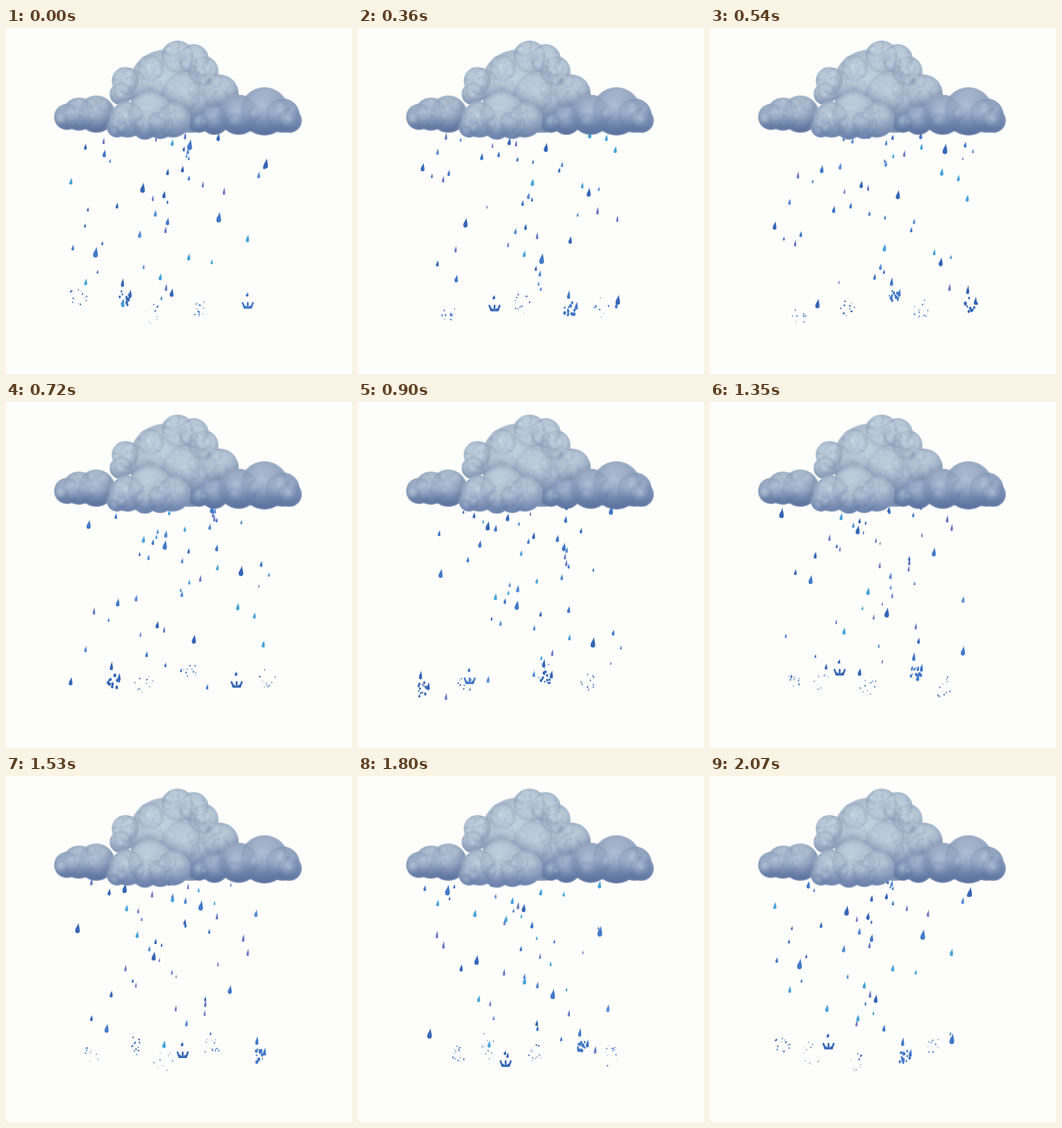
Write an HTML page with a canvas that moves like this. It is 498 px wide and 498 px high and loops after 2.16 s.

```html
<!DOCTYPE html>
<html lang="en">
<head>
<meta charset="utf-8">
<title>Rain cloud</title>
<style>
  html, body { margin: 0; width: 100%; height: 100%; overflow: hidden; background: #fdfefc; }
  canvas { display: block; width: 498px; height: 498px; }
</style>
</head>
<body>
<canvas id="stage" width="498" height="498"></canvas>
<script>
const SIZE = 498, STEPS = 24, STEP_MS = 90, TAU = Math.PI * 2;
const ctx = document.getElementById('stage').getContext('2d');

function seeded(seed) {
  return () => {
    seed = (seed + 0x6D2B79F5) | 0;
    let t = Math.imul(seed ^ (seed >>> 15), 1 | seed);
    t = (t + Math.imul(t ^ (t >>> 7), 61 | t)) ^ t;
    return ((t ^ (t >>> 14)) >>> 0) / 4294967296;
  };
}
const wrap = n => ((n % STEPS) + STEPS) % STEPS;

// ---- Cloud: groups of round puffs [x, y, radius], back to front ----
const GROUPS = [
  { tones: ['#bccbd8', '#b4c4d4', '#8a9dbc'], tufts: 60,
    puffs: [[265, 105, 46], [230, 85, 54], [308, 94, 27], [284, 62, 22], [270, 45, 22],
            [247, 42, 24], [208, 58, 20], [172, 76, 20], [165, 95, 16]] },
  { tones: ['#b3c2d1', '#93a6c2', '#566d9b'], tufts: 10,
    puffs: [[88, 128, 19], [105, 124, 24], [130, 124, 27]] },
  { tones: ['#aab9cd', '#8da1c0', '#566e9e'], tufts: 10,
    puffs: [[278, 136, 15], [300, 133, 21], [335, 125, 29], [372, 120, 35], [398, 126, 25], [408, 133, 18]] },
  { tones: ['#c3d1dd', '#a8b9cd', '#677fac'], tufts: 24,
    puffs: [[222, 140, 20], [240, 133, 25], [200, 143, 18], [160, 143, 15], [175, 132, 26], [207, 125, 32]] }
];

function union(puffs) {
  const path = new Path2D();
  for (const [x, y, r] of puffs) {
    path.moveTo(x + r, y);
    path.arc(x, y, r, 0, TAU);
  }
  return path;
}

function buildCloud() {
  const layer = document.createElement('canvas');
  layer.width = layer.height = SIZE;
  const g = layer.getContext('2d');
  const rand = seeded(12);

  // Soft ball: lit above its centre, darker towards the rim
  const ball = (x, y, r, light, dark) => {
    const fill = g.createRadialGradient(x - r * 0.15, y - r * 0.25, 0, x, y, r);
    fill.addColorStop(0, `rgba(212,227,235,${light})`);
    fill.addColorStop(0.65, 'rgba(200,216,228,0)');
    fill.addColorStop(0.66, 'rgba(84,106,148,0)');
    fill.addColorStop(0.92, `rgba(84,106,148,${dark})`);
    fill.addColorStop(1, 'rgba(84,106,148,0)');
    g.fillStyle = fill;
    g.fillRect(x - r, y - r, 2 * r, 2 * r);
  };

  g.clip(union(GROUPS.flatMap(group => group.puffs)));
  for (const { tones, tufts, puffs } of GROUPS) {
    const shape = union(puffs);
    const top = Math.min(...puffs.map(([, y, r]) => y - r));
    const bottom = Math.max(...puffs.map(([, y, r]) => y + r));
    const fill = g.createLinearGradient(0, top, 0, bottom);
    tones.forEach((tone, i) => fill.addColorStop(i / 2, tone));

    g.save();
    g.shadowColor = 'rgba(84,106,148,.55)';
    g.shadowBlur = 16;
    g.shadowOffsetY = -3;
    g.filter = 'blur(1.5px)';
    g.fillStyle = fill;
    g.fill(shape);
    g.restore();

    g.save();
    g.clip(shape);
    for (const [x, y, r] of puffs) ball(x, y, r, 0.42, 0.16);
    for (let i = 0; i < tufts; i++) {
      const [x, y, r] = puffs[i % puffs.length];
      const angle = rand() * TAU, reach = r * Math.sqrt(rand()) * 0.85;
      ball(x + Math.cos(angle) * reach, y + Math.sin(angle) * reach * 0.8 - r * 0.15, 6 + rand() * 9, 0.2, 0.08);
    }
    g.restore();
  }
  return layer;
}

// ---- Rain: drops fall from rest; every eighth one is large and splashes ----
const CLOUD_Y = 133, GRAVITY = 4.2, DROPS = 200, GOLDEN = 0.618034;
const BLUES = ['#3566b6', '#4379c8', '#5b8fd4', '#6c7cc5', '#48a4da'];

function makeDrops() {
  const rand = seeded(7);
  return Array.from({ length: DROPS }, (_, i) => {
    const big = i % 8 === 0;
    const spread = big ? (i / 8 * GOLDEN) % 1 : rand();
    const centred = !big && rand() < 0.3;
    const tone = Math.floor(rand() * (big ? 2 : 5));
    const h = big ? 12 + rand() * 4 : 5.5 + rand() * 6;
    return {
      big, h, i,
      x: centred ? 192 + spread * 72 : 93 + spread * 287,
      birth: i * STEPS / DROPS,
      end: big ? 7.75 + rand() * 0.45 : 7.3 + rand() * 1.1,
      w: h * (tone === 3 ? 0.34 : 0.44),
      color: BLUES[tone]
    };
  });
}

function drawDrop(x, y, w, h, color) {
  const r = w / 2, top = y - h / 2, base = y + h / 2;
  ctx.fillStyle = color;
  ctx.beginPath();
  ctx.moveTo(x + r * 0.45, top);
  ctx.bezierCurveTo(x + r * 0.6, top + h * 0.3, x + r, y, x + r, base - r);
  ctx.bezierCurveTo(x + r, base + r * 0.3, x - r, base + r * 0.3, x - r, base - r);
  ctx.bezierCurveTo(x - r, y, x, top + h * 0.35, x + r * 0.45, top);
  ctx.fill();
}

function drawCrown(x, y, color) {
  ctx.strokeStyle = color;
  ctx.lineWidth = 2.6;
  ctx.lineCap = 'round';
  ctx.beginPath();
  for (let i = -2; i <= 2; i++) {
    ctx.moveTo(x + i * 2.4, y + 4);
    ctx.lineTo(x + i * 3.7, y - 1 + (i % 2 ? 3 : -2));
  }
  ctx.moveTo(x - 5, y + 4);
  ctx.lineTo(x + 5, y + 4);
  ctx.stroke();
  drawDrop(x - 1, y - 15, 4, 6.5, color);
}

// Crown, then chunks, then specks that drift apart
function drawSplash({ x, end, color, i: seed }, age) {
  const y = CLOUD_Y + GRAVITY * end * end;
  if (age < 1) return drawCrown(x, y, color);
  const rand = seeded(seed), fresh = age < 2;
  if (fresh) {
    drawDrop(x - 3, y - 22, 4.5, 13, color);
    drawDrop(x + 8, y - 6, 4.5, 12, color);
  }
  ctx.fillStyle = color;
  for (let n = 0; n < 15 - age; n++) {
    const angle = rand() * TAU, reach = (0.3 + rand() * 0.7) * (7 + age * 1.8);
    const r = (0.5 + rand() * 0.7) * (fresh ? 1.8 : 1.15 - age * 0.07);
    ctx.beginPath();
    ctx.ellipse(x + Math.cos(angle) * reach, y + Math.sin(angle) * reach * 1.15, r, r * 1.3, 0, 0, TAU);
    ctx.fill();
  }
}

const cloud = buildCloud(), drops = makeDrops();
const start = performance.now();

function render() {
  const step = Math.floor((performance.now() - start) / STEP_MS) % STEPS;
  ctx.fillStyle = '#fdfefc';
  ctx.fillRect(0, 0, SIZE, SIZE);
  for (const d of drops) {
    const age = wrap(step - d.birth);
    if (age > 2 && age < d.end) drawDrop(d.x, CLOUD_Y + GRAVITY * age * age, d.w, d.h, d.color);
    else if (d.big && age >= d.end && age < d.end + 5.5) drawSplash(d, age - d.end);
  }
  ctx.drawImage(cloud, 0, 0);
  requestAnimationFrame(render);
}
render();
</script>
</body>
</html>
```
